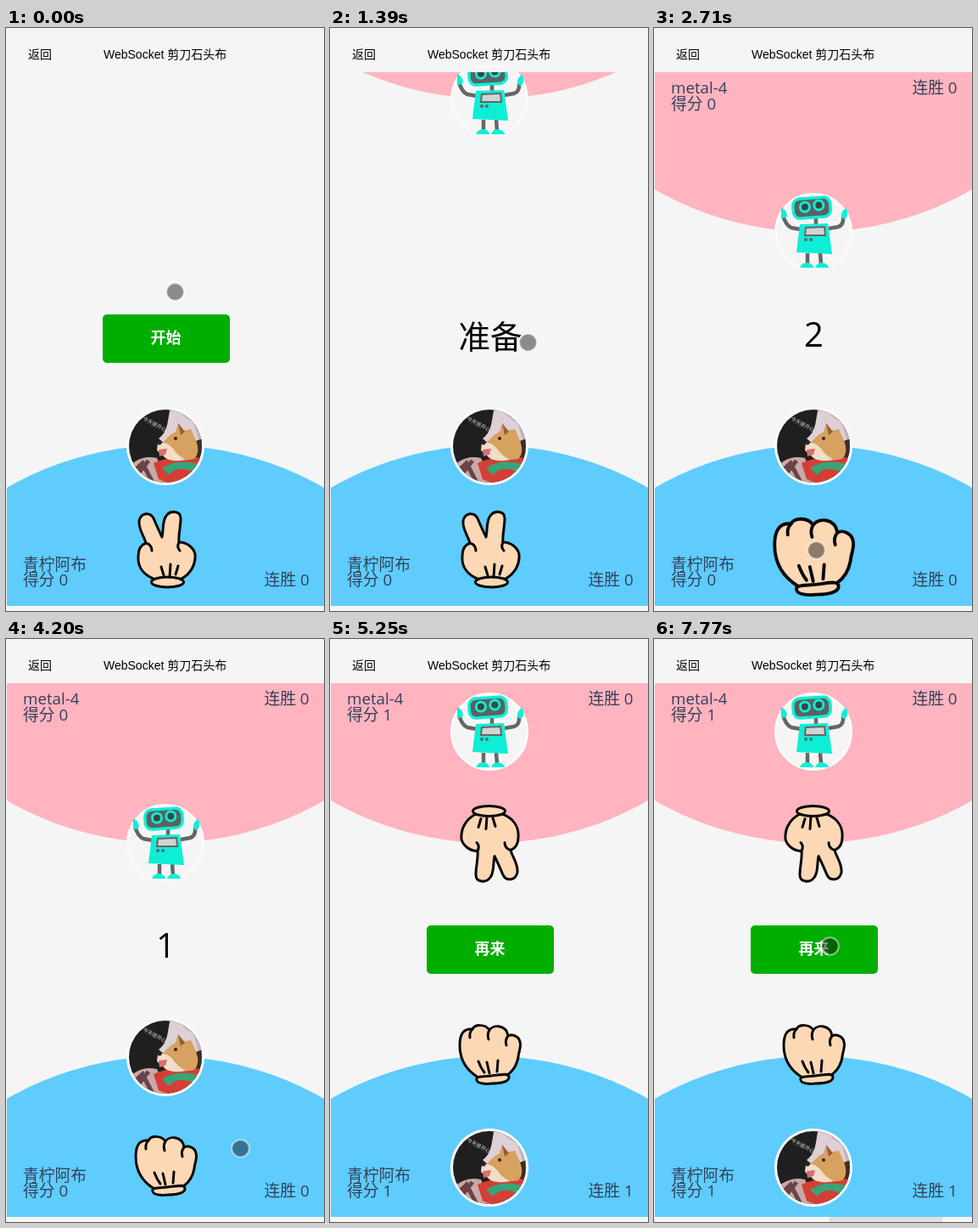
Recreate the animation shown at these times as an HTML page. Size 375x686 px, loop 8 s.

```html
<!DOCTYPE html>
<html lang="zh">
<head>
<meta charset="utf-8">
<title>WebSocket 剪刀石头布</title>
<style>
  html, body { margin: 0; width: 100%; height: 100%; overflow: hidden; background: #f5f5f5; }
  svg { display: block; width: 100vw; height: 100vh; }
  text { font-family: "Open Sans", "Noto Sans CJK SC", "Noto Sans CJK", sans-serif; }
  .bar text { font: 14px "Liberation Sans", "Noto Sans CJK SC", "Noto Sans CJK", sans-serif; }
  .info { font-size: 18.75px; fill: #34405a; }
  .big { font-size: 37.5px; text-anchor: middle; }
  .count { font-size: 40px; text-anchor: middle; }
  .label { font-size: 18px; font-weight: 700; fill: #fff; text-anchor: middle; }
  .skin { fill: #fdd8b5; }
  .hand { stroke: #080808; stroke-width: 3; stroke-linecap: round; stroke-linejoin: round; fill: none; }
  .teal { fill: #0eeed6; }
  .limb { fill: none; stroke: #666; stroke-width: 4.5; stroke-linejoin: round; }
</style>
</head>
<body>
<svg viewBox="0 0 375 686" preserveAspectRatio="none">
  <defs>
    <clipPath id="arena"><rect x="1" y="52" width="374" height="628"/></clipPath>
    <clipPath id="round"><circle r="43"/></clipPath>

    <!-- hands are drawn around their scaling centre -->
    <g id="scissors" class="hand">
      <path class="skin" d="M-13 37C-27 32-34 22-33 9C-33 1-29-4-24-6C-26-14-33-22-32-32C-30-42-19-43-15-35C-12-28-9-21-5-13C-3-22-5-32 0-38C5-45 17-44 17-35C17-25 14-15 15-7C24-7 32-1 34 7C35 19 29 30 18 36Z"/>
      <path d="M-24-6Q-17-4-17 3M15-7Q12-1 16 3"/>
      <ellipse class="skin" cx="1.500" cy="40" rx="19" ry="6"/>
      <path d="M-6 22L-3 32M5 19L4 34M14 21L11 31"/>
    </g>
    <g id="rock" class="hand">
      <path class="skin" d="M-14 35C-24 29-36 18-36-3C-36-17-31-23-21-22C-18-28-6-28-1-21C4-28 19-27 21-14C26-17 34-13 35-7C37-1 33 6 33 11C31 22 26 28 20 32Z"/>
      <path d="M-21-22Q-25-18-24-12M-1-21Q-4-16-2-10M21-14Q17-9 19-3"/>
      <path class="skin" d="M-16 38C-18 33-8 34 1 33C12 32 21 29 22 34C23 40 12 42 2 42C-6 43-15 42-16 38Z"/>
      <path d="M-14 16Q-11 24-7 29M-4 17L-1 30M9 15L8 28"/>
    </g>

    <g id="robot">
      <circle r="44.500" fill="#f5f5f5" stroke="#fafafa" stroke-width="3"/>
      <path class="limb" d="M-15-3L-26-5Q-33-8-36-20M18-4L29-6Q36-8 35-18M3-18V-9M-7 25V38M8 25L9 38"/>
      <path class="teal" d="M-38-29Q-29-24-32-17L-38-16ZM33-17Q32-25 39-28Q42-19 37-15ZM-16 42Q-14 36-7 36Q-1 37 0 42ZM2 42Q4 36 10 36Q17 37 18 42Z"/>
      <g transform="rotate(-4)">
        <rect x="-22" y="-40" width="44" height="23" rx="8" fill="#5c6260" stroke="#0eeed6" stroke-width="3.500"/>
        <g fill="#384644" stroke="#0eeed6" stroke-width="3"><circle cx="-8" cy="-30" r="5.500"/><circle cx="8.500" cy="-31" r="5.500"/></g>
      </g>
      <path class="teal" d="M-16-9L17-10L22 26L-20 24Z"/>
      <path d="M-9-5L13-6L14 4L-10 4Z" fill="#d0d5d4" stroke="#666" stroke-width="2"/>
      <g fill="#666"><circle cx="-9" cy="9" r="2"/><circle cx="-3" cy="9" r="2"/></g>
    </g>

    <g id="pet">
      <circle r="46" fill="#fafafa"/>
      <g clip-path="url(#round)">
        <rect x="-45" y="-45" width="90" height="90" fill="#201f20"/>
        <path d="M6-46C2-30 4-18-8-9L18 14L48 2V-46Z" fill="#ddd0d6"/>
        <path d="M14-46Q20-33 33-28L40-4L48-46Z" fill="#c4b3be"/>
        <path d="M28-3L46-10V20L26 16Z" fill="#3c2c28"/>
        <path d="M-46 27Q-30 9-10 14L4 46H-46Z" fill="#c9a8a9"/>
        <path d="M-44 36L-27 20L-15 43M-35 44L-31 31L-20 17" fill="none" stroke="#684446" stroke-width="5"/>
        <path d="M-14 20Q6 10 45 14V37Q17 51-8 39Z" fill="#d43e35"/>
        <path d="M-4 26Q12 14 39 21L31 30Q15 22 4 34Z" fill="#37a477"/>
        <path d="M15-27L20-18L30-20L35-9Q42 7 34 15Q15 19 5 10L-6 0Q2-12 12-17Z" fill="#d7a15f"/>
        <path d="M-9-4Q2-6 9 3Q13 10 24 16Q4 20-3 11L-10 5Z" fill="#f2ddc7"/>
        <path d="M-8 4L2 3L0 10L-7 12Z" fill="#d86f71"/>
        <circle cx="-7" cy="-4" r="2.500" fill="#302321"/><circle cx="12" cy="-9" r="2" fill="#302321"/>
        <path d="M15-27L18-13L23-17Z" fill="#945d37"/>
        <text transform="translate(-27 -31) rotate(28)" font-size="6" fill="#ddd">今天很开心</text>
      </g>
    </g>
  </defs>

  <rect width="375" height="686" fill="#f5f5f5"/>
  <g clip-path="url(#arena)">
    <g id="rival">
      <circle cx="188" cy="-135" r="375" fill="#ffb4c0"/>
      <text class="info" x="20" y="77">metal-4</text>
      <text class="info" x="20" y="96">得分 <tspan class="score">0</tspan></text>
      <text class="info" x="304.500" y="77">连胜 0</text>
      <use id="rivalFace" href="#robot"/>
      <use id="rivalHand" href="#scissors" transform="translate(189 242.500) rotate(180)"/>
    </g>
    <circle cx="188" cy="866" r="375" fill="#5eccfd"/>
    <text class="info" x="20" y="637.500">青柠阿布</text>
    <text class="info" x="20" y="656">得分 <tspan class="score">0</tspan></text>
    <text class="info" x="304.500" y="656">连胜 <tspan class="score">0</tspan></text>
    <use id="ownFace" href="#pet"/>
    <use id="ownHand"/>
  </g>
  <text id="ready" class="big" x="189" y="377">准备</text>
  <text id="count" class="count" x="188.500" y="375"></text>
  <g id="button">
    <rect x="114" y="337" width="150" height="57" rx="5" fill="#00ae00"/>
    <text id="caption" class="label" x="188.500" y="371"></text>
  </g>
  <g class="bar"><text x="26" y="36">返回</text><text x="115" y="36">WebSocket 剪刀石头布</text></g>
  <rect id="dock" x="207" y="680" width="133" height="6" fill="#dfdfdf"/>
  <circle id="pointer" r="10.300" fill="#000" fill-opacity=".43" stroke="#fff" stroke-opacity=".5" stroke-width="2"/>
</svg>
<script>
const LOOP = 8000;
const START = 1200, REVEAL = 4345, AGAIN = 4945;
// bursts of motion: start, end, number of updates
const bursts = [[500, 1540, 8], [1690, 2710, 8], [2860, 3900, 8], [4050, 4500, 4],
                [4950, 5250, 3], [6140, 6440, 3], [7030, 7770, 6]];
// time, x, y
const route = [[350, 199.5, 310.5], [950, 200, 358], [1090, 202, 362], [1390, 233.5, 369.5],
  [1540, 236, 420], [1980, 231.5, 469.5], [2560, 192, 611], [2710, 191.5, 614.5], [3160, 191.5, 614.5],
  [3900, 276.5, 599.5], [4200, 276.5, 599.5], [4500, 305, 626], [6140, 202, 678],
  [6440, 202, 638], [6890, 202, 638], [7770, 207.5, 361.5]];
const pulse = [[2420, 1], [2710, 1.3], [2860, 1.3], [3160, 1]];

const el = id => document.getElementById(id);
const scores = document.querySelectorAll('.score');
const show = (id, on) => el(id).style.display = on ? '' : 'none';
const move = (id, x, y, scale = 1) =>
  el(id).setAttribute('transform', `translate(${x} ${y}) scale(${scale})`);

function snap(t) {
  let held = 0;
  for (const [start, end, count] of bursts) {
    if (t < start) break;
    const step = (end - start) / (count - 1);
    held = Math.min(end, start + Math.floor((t - start) / step + 0.02) * step);
  }
  return held;
}

function sample(keys, t) {
  const next = keys.findIndex(key => key[0] > t);
  if (next === 0) return keys[0].slice(1);
  if (next < 0) return keys[keys.length - 1].slice(1);
  const a = keys[next - 1], b = keys[next];
  const u = (t - a[0]) / (b[0] - a[0]);
  return a.slice(1).map((v, i) => v + (b[i + 1] - v) * u);
}

function draw(t) {
  const revealed = t >= REVEAL;
  const slide = Math.min(1, Math.max(0, (t - 1300) / 500));
  move('rival', 0, -235 * (1 - slide) ** 2);
  show('rival', slide > 0);
  show('rivalHand', revealed);
  move('rivalFace', 188, revealed ? 109 : 240);
  move('ownFace', 188, revealed ? 622 : 492);
  el('ownHand').setAttribute('href', t < 2550 ? '#scissors' : '#rock');
  move('ownHand', 189, revealed ? 481 : 612, sample(pulse, t)[0]);
  scores.forEach(s => s.textContent = revealed ? 1 : 0);

  show('ready', t >= START && t < 2250);
  show('count', t >= 2250 && !revealed);
  el('count').textContent = t < 3290 ? 2 : 1;
  show('button', t < START || t >= AGAIN);
  el('caption').textContent = t < START ? '开始' : '再来';
  show('dock', t >= 6140);
  show('pointer', t < AGAIN || t >= 6140);
  move('pointer', ...sample(route, t));
}

const began = performance.now();
function tick() {
  draw(snap((performance.now() - began) % LOOP));
  requestAnimationFrame(tick);
}
tick();
</script>
</body>
</html>
```
